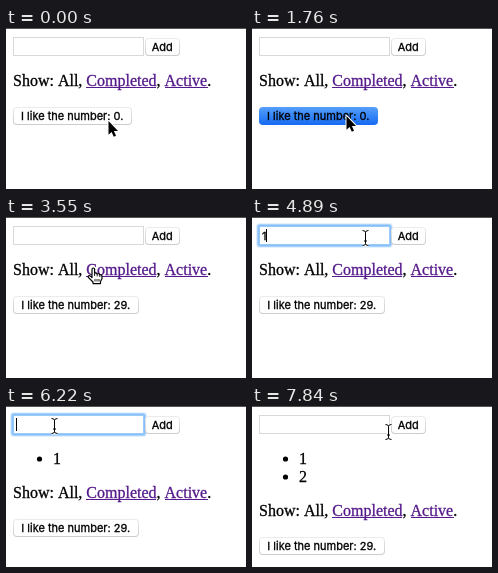
An HTML page with a canvas that plays this animation: 240x161 px, repeating every 7.99 s.

```html
<!DOCTYPE html>
<html lang="en">
<head>
<meta charset="utf-8">
<title>Todo list</title>
<style>
html, body { margin: 0; width: 100%; height: 100%; overflow: hidden; background: #fff; }
canvas { display: block; }
</style>
</head>
<body>
<canvas id="stage" width="240" height="161"></canvas>
<script>
const ctx = document.getElementById('stage').getContext('2d');
const LOOP = 7990;
const UI = '11px Inter, "Liberation Sans", sans-serif';
const SERIF = '16px "Liberation Serif", "Times New Roman", serif';

const start = {
  cursor: ['arrow', 101, 91], focus: false, caret: false, value: '',
  items: 0, number: 0, pressed: ''
};

// Each step changes part of the page state at a time in ms.
const steps = [
  [150, { cursor: ['arrow', 96, 87] }],
  [270, { cursor: ['arrow', 93, 86] }],
  [1310, { focus: true, caret: true }],
  [1760, { focus: false, pressed: 'number' }],
  [1910, { pressed: '', number: 94 }],
  [2510, { pressed: 'number' }],
  [2660, { pressed: '', number: 29 }],
  [3250, { cursor: ['arrow', 91, 77] }],
  [3400, { cursor: ['arrow', 86, 62] }],
  [3550, { cursor: ['hand', 81, 50] }],
  [3700, { cursor: ['arrow', 93, 34] }],
  [3850, { cursor: ['beam', 108, 22] }],
  [4000, { cursor: ['beam', 113, 21] }],
  [4150, { focus: true, caret: true }],
  [4450, { caret: false }],
  [4890, { value: '1', caret: true }],
  [5040, { cursor: ['beam', 127, 21] }],
  [5190, { cursor: ['arrow', 146, 18] }],
  [5330, { pressed: 'add', focus: false }],
  [5480, { pressed: '', value: '', items: 1 }],
  [5630, { cursor: ['beam', 117, 20] }],
  [5770, { cursor: ['beam', 66, 20] }],
  [5920, { cursor: ['beam', 48, 20] }],
  [6220, { focus: true, caret: true }],
  [6510, { value: '2' }],
  [6800, { cursor: ['beam', 73, 20] }],
  [6950, { cursor: ['beam', 122, 21] }],
  [7100, { cursor: ['arrow', 143, 19] }],
  [7250, { pressed: 'add', focus: false }],
  [7400, { pressed: '', value: '', items: 2 }],
  [7840, { cursor: ['beam', 136, 26] }]
];

function stateAt(time) {
  const state = { ...start };
  for (const [at, change] of steps) if (time >= at) Object.assign(state, change);
  return state;
}

// A hairline stroke gives the text the heavier look of macOS smoothing.
function text(string, x, y, font, color = '#000') {
  ctx.font = font;
  ctx.fillStyle = ctx.strokeStyle = color;
  ctx.lineWidth = 0.3;
  ctx.fillText(string, x, y);
  ctx.strokeText(string, x, y);
  return x + ctx.measureText(string).width;
}

function box(x, y, w, h, radius, fill) {
  ctx.beginPath();
  ctx.roundRect(x, y, w, h, radius);
  ctx.fillStyle = fill;
  ctx.fill();
}

function shade(y, h, top, bottom) {
  const gradient = ctx.createLinearGradient(0, y, 0, y + h);
  gradient.addColorStop(0, top);
  gradient.addColorStop(1, bottom);
  return gradient;
}

function button(label, x, y, w, pressed) {
  if (pressed) {
    box(x, y, w, 18, 4, shade(y, 18, '#559ff9', '#166af3'));
  } else {
    box(x, y, w, 18, 4, shade(y, 18, '#ececec', '#cbcbcb'));
    box(x + 1, y + 1, w - 2, 16, 3, '#fff');
  }
  ctx.font = UI;
  text(label, x + (w - ctx.measureText(label).width) / 2 - 0.3, y + 13, UI);
}

function input({ focus, caret, value }) {
  if (focus) {
    box(4, 6, 137, 25, 4, '#e3f0fe');
    box(5, 7, 135, 23, 3, '#a9d3fd');
    box(6, 8, 133, 21, 2, '#86bffa');
  }
  box(7, 9, 131, 19, 0, focus ? '#9ccaf8' : '#d9d9d9');
  box(8, 10, 129, 17, 0, '#fff');
  const end = text(value, 10, 23, UI);
  if (focus && caret) box(Math.round(end), 12, 1, 13, 0, '#000');
}

function link(label, x, y) {
  const end = text(label, x, y, SERIF, '#551a8b');
  ctx.fillRect(Math.round(x), y + 1, Math.round(end - x), 1);
  return end;
}

const arrow = new Path2D('M1.5 2V15.8L4.6 12.9L6.8 17.7L9 16.7L6.9 12H11Z');
const hand = new Path2D('M5 9V2.5Q5 1 6.3 1T7.6 2.5V6.3Q9.8 5.5 10.2 7Q12.4 6.2 12.8 7.8' +
  'Q15 7.4 15 9.5V11.8L13.5 14.5V16.6H6V15L1.3 10.3Q.8 8.4 2.8 8.6L5 10.6Z');
const knuckles = new Path2D('M7.6 6.3V9M10.2 7V9.4M12.8 8V10M8 12V14.5M10 12V14.5M12 12V14.5');
const beam = new Path2D('M-3 -7.5Q0 -7.5 0 -5.5Q0 -7.5 3 -7.5M0 -5.5V5.5M-3 7.5Q0 7.5 0 5.5Q0 7.5 3 7.5M-1.5 3H1.5');

function line(path, color, width) {
  ctx.strokeStyle = color;
  ctx.lineWidth = width;
  ctx.stroke(path);
}

function drawCursor([kind, x, y]) {
  ctx.save();
  ctx.translate(x, y);
  ctx.lineJoin = 'round';
  if (kind === 'beam') {
    ctx.translate(0.5, 0);
    line(beam, '#fff', 2.5);
    line(beam, '#000', 1);
  } else if (kind === 'hand') {
    ctx.fillStyle = '#fff';
    ctx.fill(hand);
    line(hand, '#000', 1.2);
    line(knuckles, '#000', 0.9);
  } else {
    line(arrow, '#fff', 2);
    ctx.fillStyle = '#000';
    ctx.fill(arrow);
  }
  ctx.restore();
}

function draw(state) {
  box(0, 0, 240, 161, 0, '#fff');
  box(0, 0, 240, 1, 0, '#555');
  input(state);
  button('Add', 139, 10, 35, state.pressed === 'add');

  for (let i = 0; i < state.items; i++) {
    const y = 58 + 18 * i;
    ctx.beginPath();
    ctx.arc(33.5, y - 5, 2.6, 0, Math.PI * 2);
    ctx.fillStyle = '#000';
    ctx.fill();
    text(String(i + 1), 47, y, SERIF);
  }

  const shift = state.items ? 16 + 18 * state.items : 0;
  const y = 58 + shift;
  let x = text('Show: All, ', 7, y, SERIF);
  x = link('Completed', x, y);
  x = text(', ', x, y, SERIF);
  x = link('Active', x, y);
  text('.', x, y, SERIF);

  button(`I like the number: ${state.number}.`, 7, 79 + shift,
    state.number > 9 ? 126 : 119, state.pressed === 'number');
  drawCursor(state.cursor);
}

const began = performance.now();
function frame() {
  draw(stateAt((performance.now() - began) % LOOP));
  requestAnimationFrame(frame);
}
frame();
</script>
</body>
</html>
```
